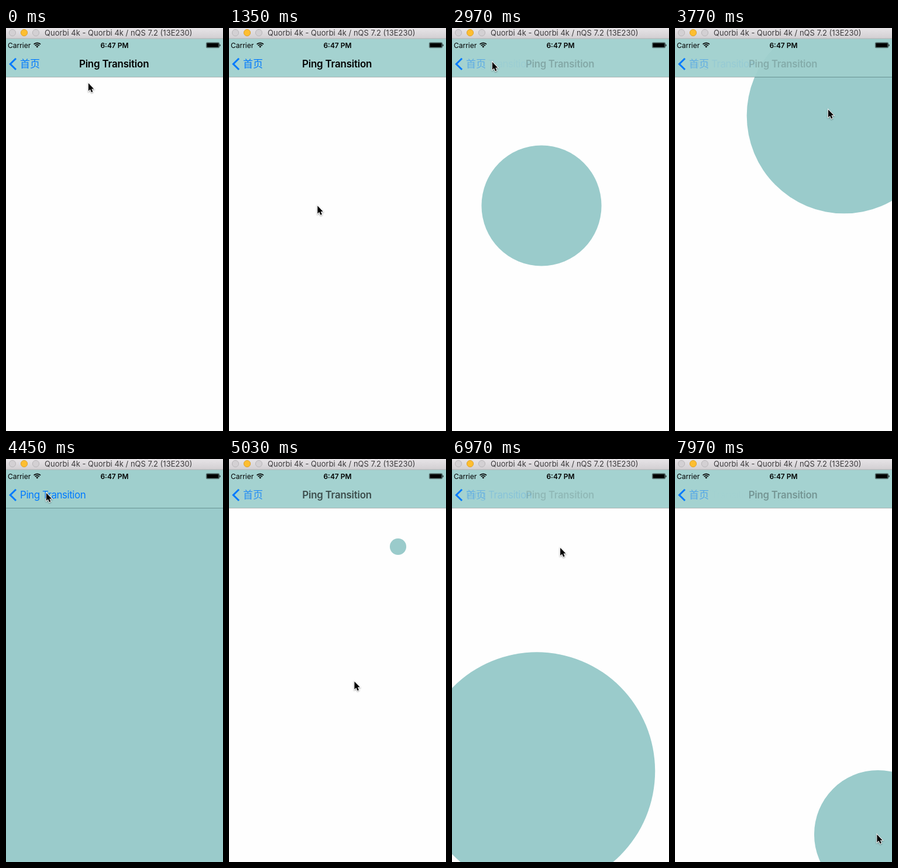
Animation of 371 by 685 pixels, one loop 8 s. Source, as an HTML page:

```html
<!DOCTYPE html>
<html lang="en">
<head>
<meta charset="utf-8">
<title>Ping Transition</title>
<style>
  html, body { margin: 0; width: 100%; height: 100%; overflow: hidden; background: #fefefe; }
  svg { display: block; width: 371px; height: 685px; }
  text { font-family: Inter, "Noto Sans CJK SC", "Noto Sans CJK", sans-serif; white-space: pre; }
  .window { font-size: 13px; fill: #3c3a3c; }
  .status { font-size: 12px; }
  .strong { font-weight: 600; }
  .nav { font-size: 17px; letter-spacing: -.46px; }
  .link { fill: #007aff; }
  #home { letter-spacing: 0; }
  #title { letter-spacing: -.22px; }
  #cursor { filter: drop-shadow(0 1px 1px rgba(0, 0, 0, .4)); }
</style>
</head>
<body>
<svg viewBox="0 0 371 685">
  <defs>
    <linearGradient id="chrome" x2="0" y2="1">
      <stop stop-color="#e7e4e7"/>
      <stop offset="1" stop-color="#d2cfd2"/>
    </linearGradient>
  </defs>

  <rect width="371" height="685" fill="#fefefe"/>
  <circle id="ping" fill="#9acbcb"/>

  <!-- navigation bar -->
  <rect y="18" width="371" height="65" fill="rgba(160,208,206,.95)"/>
  <rect y="83" width="371" height="1" fill="rgba(0,30,30,.32)"/>
  <path d="M17 51.7 7.3 61.2 17 70.7" fill="none" stroke="#007aff" stroke-width="3"/>
  <text id="home" class="nav link" x="24" y="67">首页</text>
  <text id="back" class="nav link" x="24" y="67">Ping Transition</text>
  <text id="title" class="nav strong" y="67" text-anchor="middle">Ping Transition</text>

  <!-- status bar -->
  <text class="status" x="3" y="33.5">Carrier</text>
  <g fill="none" stroke="#000" stroke-width="1.7">
    <path d="M47.6 27.7a8 8 0 0 1 11.4 0M49.7 30a5 5 0 0 1 7.2 0"/>
    <path d="M51.3 31.4a2.8 2.8 0 0 1 4 0L53.3 33.6Z" fill="#000" stroke="none"/>
  </g>
  <text class="status strong" x="185.5" y="33.5" text-anchor="middle">6:47 PM</text>
  <rect x="342.4" y="24.7" width="22.2" height="9" rx="1.4" fill="none" stroke="#000" stroke-width=".5"/>
  <rect x="343.3" y="25.6" width="20.4" height="7.2" rx=".6"/>
  <path d="M365.6 27.6q1.6 1.7 0 3.6z" stroke="#000" stroke-width=".5"/>

  <!-- window title -->
  <rect width="371" height="18" fill="url(#chrome)"/>
  <rect y="17.5" width="371" height="1" fill="#b4b2b4"/>
  <g fill="#d3d0d3" stroke="#bab7ba">
    <circle cx="11" cy="8" r="5.6"/>
    <circle cx="31" cy="8" r="5.6" fill="#fdbe30" stroke="#dea12c"/>
    <circle cx="51" cy="8" r="5.6"/>
  </g>
  <text class="window" x="66" y="13">Quorbi 4k - Quorbi 4k / nQS 7.2 (13E230)</text>

  <path id="cursor" d="M.9 .8V14L3.9 11.3 6.1 16.2 8.4 15.2 6.3 10.4H10.2Z"
        stroke="#fff" stroke-width="1.8" paint-order="stroke"/>
</svg>
<script>
  const LOOP = 8000, DURATION = 500;
  const TOP = 18, WIDTH = 371, HEIGHT = 685;
  const BACK = { x: 68, y: 57 }, BOW = .23;

  // the pointer leaves for a spot, arrives, opens a ping there and closes it from the back link
  const pings = [
    { x: 153, y: 302, leave: 410, arrive: 640, open: 1350, close: 2638 },
    { x: 289, y: 149, leave: 3000, arrive: 3370, open: 3590, close: 4585 },
    { x: 145, y: 530.5, leave: 4735, arrive: 5420, open: 5817, close: 6680 },
    { x: 347, y: 638, leave: 6930, arrive: 7420, open: 7835, close: Infinity },
  ];

  const origin = { x: 140, y: 93 };
  const legs = [
    { x: 140, y: 211, leave: 110, arrive: 290 },
    { x: 238, y: 447, leave: 1400, arrive: 1760 },
    ...pings.flatMap(({ x, y, leave, arrive, close }, i) => [
      { x: x - 2.5, y: y - .5, leave, arrive, bow: i && BOW },
      { ...BACK, leave: close - 850, arrive: close - 250 },
    ]),
  ].filter(leg => leg.leave < LOOP).sort((a, b) => a.leave - b.leave);

  const el = id => document.getElementById(id);
  const [ping, home, back, title, cursor] = ["ping", "home", "back", "title", "cursor"].map(el);
  const clamp = v => Math.min(1, Math.max(0, v));
  const smooth = v => { const c = clamp(v); return c * c * (3 - 2 * c); };

  // cubic-bezier(.42, 0, .58, 1)
  function easeInOut(t) {
    let low = 0, high = 1;
    for (let i = 0; i < 24; i++) {
      const s = (low + high) / 2;
      const x = 1.26 * s * (1 - s) * (1 - s) + 1.74 * s * s * (1 - s) + s ** 3;
      if (x < t) low = s; else high = s;
    }
    return smooth(low);
  }

  function pointerAt(t) {
    let { x, y } = origin;
    for (const leg of legs) {
      const k = 1 - (1 - clamp((t - leg.leave) / (leg.arrive - leg.leave))) ** 2;
      const dy = leg.y - y;
      x += (leg.x - x) * k + (leg.bow || 0) * dy * 4 * k * (1 - k);
      y += dy * k;
    }
    return [x, y];
  }

  function draw(t) {
    const { x, y, open, close } = pings.findLast(p => t >= p.open) || pings[0];
    const shown = clamp((t - open) / DURATION) - clamp((t - close) / DURATION);
    const reach = Math.hypot(Math.max(x, WIDTH - x), Math.max(y - TOP, HEIGHT - y));

    ping.setAttribute("cx", x);
    ping.setAttribute("cy", y);
    ping.setAttribute("r", shown > 0 ? reach * easeInOut(shown) : 0);

    title.style.opacity = (1 - shown) ** 4;
    title.setAttribute("transform", `translate(184.6 0) scale(${1 - .05 * shown} 1)`);
    home.style.opacity = (1 - shown) ** 2.2;
    back.style.opacity = smooth((shown - .25) / .65);
    cursor.setAttribute("transform", `translate(${pointerAt(t)})`);
  }

  const start = performance.now();
  function tick() {
    draw((performance.now() - start) % LOOP);
    requestAnimationFrame(tick);
  }
  tick();
</script>
</body>
</html>
```
